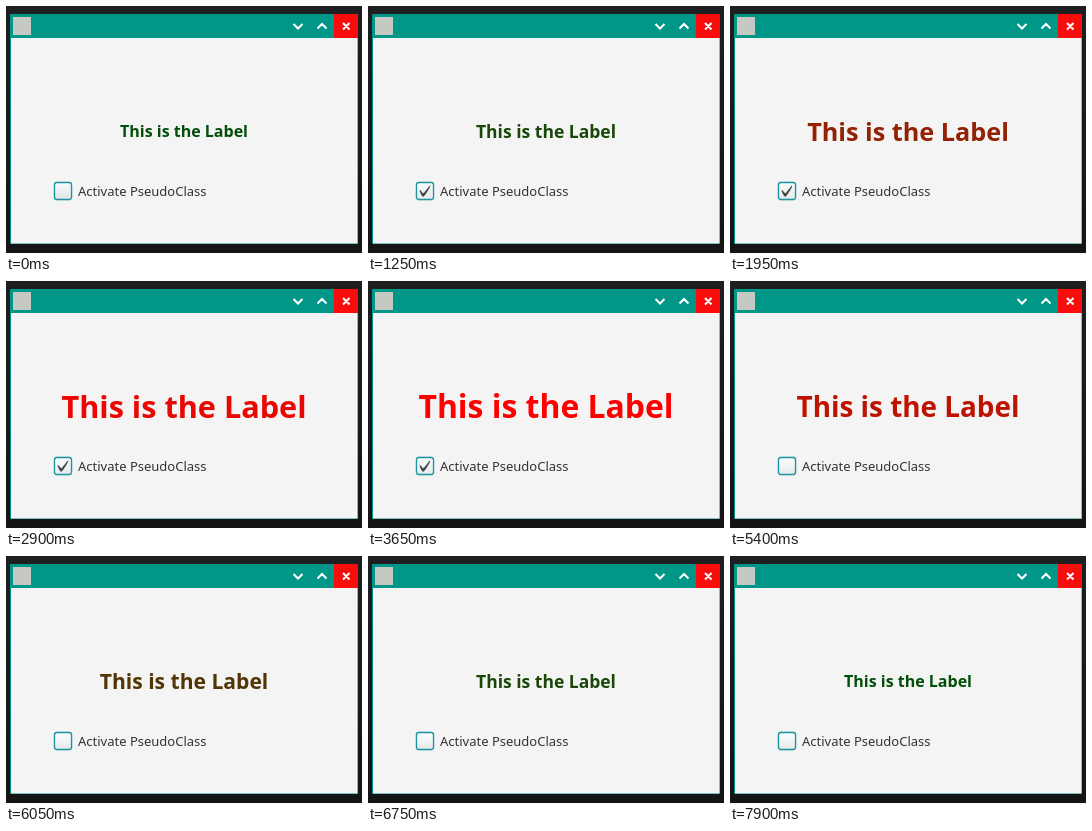
Animation, 356 px wide and 247 px high, one loop 8000 ms. Source, as an HTML page:

```html
<!DOCTYPE html>
<html lang="en">
<head>
<meta charset="utf-8">
<style>
  html, body { margin: 0; height: 100%; overflow: hidden; background: #1a1b1c; }
  svg { display: block; width: 356px; height: 247px; }
  text { font-family: "Noto Sans", sans-serif; }
  #label { font-weight: 700; font-size: 16px; text-anchor: middle; }
  .icon { fill: none; stroke: #fff; stroke-width: 2; }
</style>
</head>
<body>
<svg viewBox="0 0 356 247">
  <defs>
    <linearGradient id="backdrop" x2="0" y2="1">
      <stop stop-color="#1e1f21"/><stop offset="1" stop-color="#141414"/>
    </linearGradient>
    <linearGradient id="face" x2="0" y2="1">
      <stop id="faceTop"/><stop id="faceBottom" offset="1"/>
    </linearGradient>
  </defs>
  <rect width="356" height="247" fill="url(#backdrop)"/>

  <!-- window -->
  <rect x="4" y="8" width="348" height="230" rx="1" fill="#009688"/>
  <rect x="5" y="32" width="346.5" height="205.5" fill="#f4f4f4"/>
  <rect x="7" y="11" width="18" height="18" fill="#c6c8c4"/>
  <rect x="328" y="8" width="24" height="24" fill="#f80c0c"/>
  <path class="icon" d="M287.5 18l4.5 4.5 4.5-4.5M311.5 22.5l4.5-4.5 4.5 4.5M337 17l6.5 6.5m0-6.5l-6.5 6.5"/>

  <text id="label" y="6.2">This is the Label</text>

  <!-- check box -->
  <rect x="47.5" y="175.5" width="19" height="19" rx="3.5" fill="#009688" opacity=".16"/>
  <rect x="48.5" y="176.5" width="17" height="17" rx="2.5" fill="url(#face)" stroke="#1c95a0" stroke-width="1.3"/>
  <path id="tick" fill="#444" transform="translate(51.8 180) scale(.66)"
    d="M-.25 6.1c.85-.75 4.6 4.8 5.75 4.8S14.5-1.5 15.9-.9c1.3.5-8.75 17.1-10.5 17.1C3 16.2-1.1 6.8-.25 6.1z"/>
  <text x="72" y="190" font-size="13" fill="#333">Activate PseudoClass</text>
</svg>
<script>
  const LOOP = 8000, DURATION = 3000, GROW = 950, SHRINK = 4850;
  const DARK = [0, 78, 8], RED = [255, 0, 0];
  const $ = id => document.getElementById(id);
  const mix = (a, b, k) => a + (b - a) * k;
  const between = (t, from, to) => t >= from && t < to;

  // cubic-bezier(.25, .1, .25, 1)
  function ease(x) {
    if (x <= 0 || x >= 1) return x <= 0 ? 0 : 1;
    let lo = 0, hi = 1;
    for (let i = 0; i < 24; i++) {
      const s = (lo + hi) / 2;
      if (.75 * s * (1 - s) + s ** 3 < x) lo = s; else hi = s;
    }
    return .3 * lo * (1 - lo) ** 2 + 3 * (1 - lo) * lo * lo + lo ** 3;
  }

  function draw(now) {
    const t = now % LOOP;
    const k = ease((t - GROW) / DURATION) - ease((t - SHRINK) / DURATION);
    $("label").setAttribute("transform", `translate(178 124.8) scale(${1 + k})`);
    $("label").setAttribute("fill", `rgb(${DARK.map((c, i) => Math.round(mix(c, RED[i], k)))})`);
    $("tick").style.display = between(t, 900, 4800) ? "" : "none";

    const pressed = between(t, 550, 900) || between(t, 4350, 4800);
    const hovered = t >= 200;
    const [top, bottom] = pressed ? ["#e6e6e6", "#d2d2d2"]
      : hovered ? ["#fdfdfd", "#e6e9ea"] : ["#f8f9f9", "#e0e5e5"];
    $("faceTop").setAttribute("stop-color", top);
    $("faceBottom").setAttribute("stop-color", bottom);
    requestAnimationFrame(draw);
  }
  requestAnimationFrame(draw);
</script>
</body>
</html>
```
